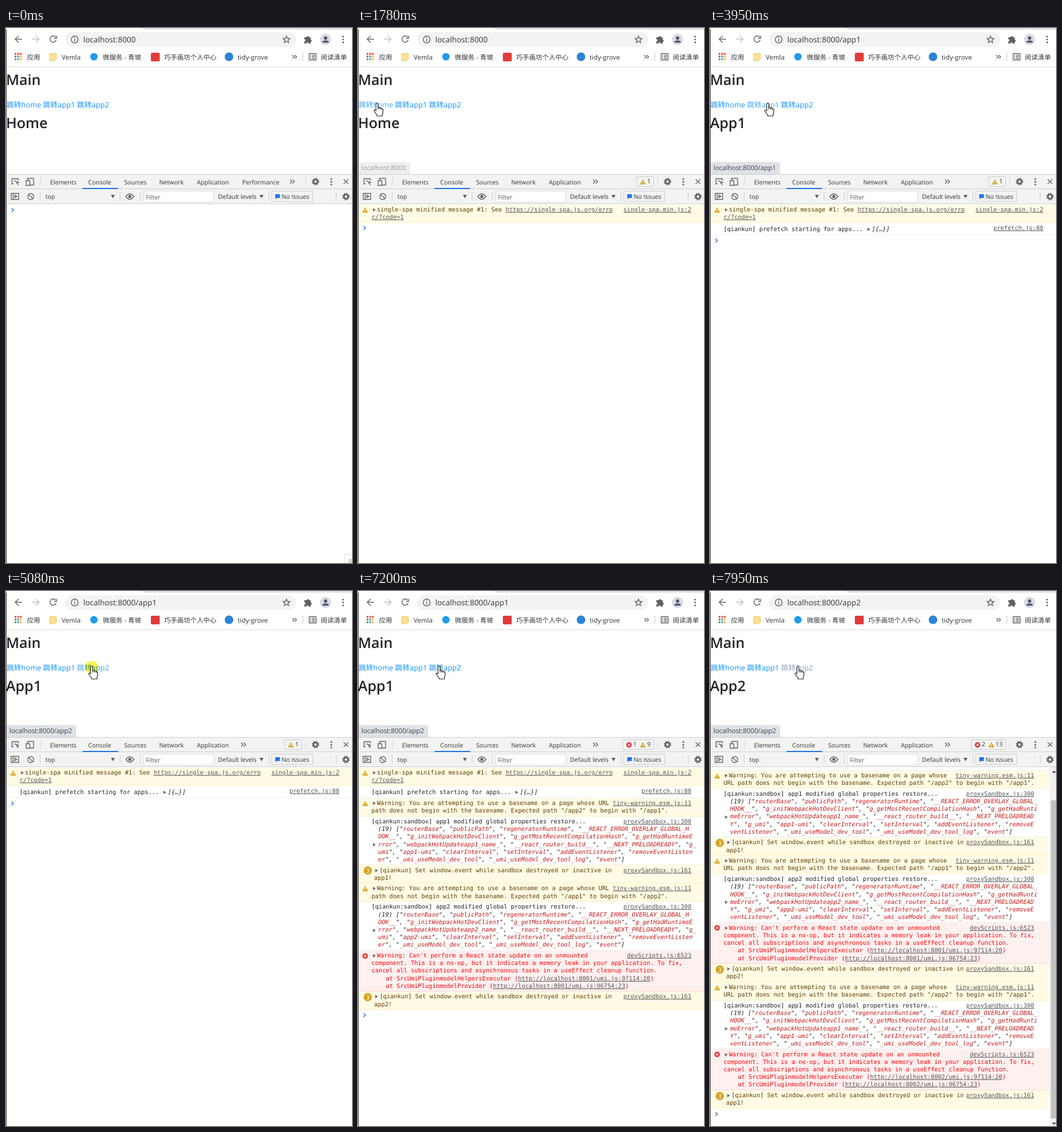
An HTML page that plays this animation: 602 by 930 pixels, repeating every 8 s.

```html
<!DOCTYPE html>
<html lang="zh">
<head>
<meta charset="utf-8">
<style>
html, body { margin: 0; width: 100%; height: 100%; overflow: hidden; background: #fff; }
#stage { position: relative; width: 602px; height: 930px; overflow: hidden; text-rendering: geometricPrecision;
  font: 10.7px "Open Sans", "Noto Sans", "Noto Sans CJK SC", "Noto Sans CJK", sans-serif; color: #333; }
#stage > * { position: absolute; }
svg { display: block; overflow: visible; }
text { fill: #333; }
.bm { font-size: 11.4px; }
.link { font-size: 12.8px; }
.head { font-size: 25px; font-weight: 600; fill: #212529; }
.ic { fill: none; stroke: #5f6368; stroke-width: 1.4; }
.solid { fill: #5f6368; }
.sep { stroke: #ccc; }
#status { left: 1px; top: 233px; height: 21px; padding: 0 7.5px 0 5px; line-height: 21px; font-size: 11.5px;
  background: #dee1e6; color: #3c4043; border-top-right-radius: 4px; box-sizing: border-box; }
#badge { right: 87px; top: 258px; height: 16px; padding: 0 4px 0 5px; line-height: 17px; border: 1px solid #ccc;
  border-radius: 2px; display: flex; align-items: center; gap: 2px; }
#badge b { font-weight: 400; margin-right: 3px; }
#badge b:last-child { margin-right: 1px; }
#console { left: 1px; top: 306px; width: 601px; height: 624px; overflow: hidden; background: #fff; }
#log { padding-top: .6px; font: 10.33px/13.2px "DejaVu Sans Mono", "Noto Sans Mono", monospace; }
.row { position: relative; white-space: pre; padding: 3.3px 0 1.15px 22.5px; border-bottom: 1px solid #f0f0f0; color: #222; }
.one { padding: 5.2px 0 2px 22.5px; }
.warn { background: #fffbe5; border-color: #fff0b8; color: #5c3c00; }
.win { padding-left: 27px; }
.err { background: #fff0f0; border-color: #ffd6d6; color: #f00; }
.row a { position: absolute; right: 22px; top: 3.3px; }
.row a, .row u { color: #545454; text-decoration: underline; }
.row > svg { position: absolute; left: 6px; top: 4px; }
.list { position: relative; padding-left: 11.5px; font-style: italic; }
.list s { color: #c41a16; text-decoration: none; }
.tri { display: inline-block; width: 9.4px; }
.tri::before { content: ""; display: block; width: 0; margin-left: 2px; border: 3.3px solid transparent;
  border-left: 5px solid #6e6e6e; border-right: 0; }
.list .tri { position: absolute; left: 0; top: 30px; }
.narrow .row { width: 567.5px; }
.narrow .win { width: 563px; }
.narrow .row a { right: 27px; }
#prompt { height: 30px; }
#cursor { left: 0; top: 0; }
#click { mix-blend-mode: multiply; }
</style>
</head>
<body>
<div id="stage">
<svg width="602" height="930">
  <path d="M237 0H602V3H243Q239 3 237 0" fill="#dee1e6"/>
  <rect x="103" y="7" width="402" height="26" rx="13" fill="#f1f3f4"/>
  <g class="ic">
    <path d="M28 19.500H16.500M22 13.500L16 19.500L22 25.500"/>
    <path d="M45 19.500H57M51.500 13.500L57.500 19.500L51.500 25.500" stroke="#bdc1c6" style="stroke:#bdc1c6"/>
    <path d="M86.500 16A5.500 5.500 0 1 0 87.300 21M88 13.500V18H83.500"/>
    <circle cx="119.500" cy="20" r="6"/><path d="M119.500 19V23.500M119.500 16.300V17.800"/>
    <path d="M488 14L489.700 18L494 18.300L490.700 21.100L491.800 25.300L488 23L484.200 25.300L485.300 21.100L482 18.300L486.300 18Z"/>
  </g>
  <path class="solid" d="M519 16H523A2 2 0 0 1 527 16H530V20A2 2 0 0 1 530 24V27H526.500A2 2 0 0 0 522.500 27H519V23.500A2 2 0 0 0 519 19.500Z"/>
  <circle cx="556" cy="20" r="10" fill="#dadde3"/>
  <path d="M550.500 25.500V24Q551 21.500 556 21.500T561.500 24V25.500Z" fill="#4d5878"/><circle cx="556" cy="17.500" r="3" fill="#4d5878"/>
  <g class="solid"><circle cx="586.500" cy="15" r="1.500"/><circle cx="586.500" cy="20" r="1.500"/><circle cx="586.500" cy="25" r="1.500"/></g>
  <text id="url" x="134.500" y="24.800" font-size="13.500"></text>

  <g id="apps"></g>
  <path d="M76.500 44.500H87.500V53L84 57H76.500Z" fill="#fde293" stroke="#e8c468"/>
  <circle cx="153" cy="50" r="6.500" fill="#1e9af0"/>
  <rect x="252" y="43" width="15.500" height="15" rx="2" fill="#e03c3a"/>
  <circle cx="388" cy="50" r="7.500" fill="#2f83d6"/>
  <g class="bm">
    <text x="36.500" y="54.500">应用</text>
    <text x="97" y="54.500">Vemla</text>
    <text x="168.500" y="54.500">微服务 - 青坡</text>
    <text x="275" y="54.500">巧手画坊个人中心</text>
    <text x="403" y="54.500">tidy-grove</text>
    <text x="547.500" y="54.500">阅读清单</text>
  </g>
  <path class="ic" d="M498.500 47L501.500 50L498.500 53M502.500 47L505.500 50L502.500 53"/>
  <path class="sep" d="M516.500 43V57"/>
  <path class="ic" d="M527.500 44.500H539.500V55.500H527.500ZM529.500 47.500H531M532.500 47.500H537.500M529.500 50H531M532.500 50H537.500M529.500 52.700H531M532.500 52.700H537.500"/>
  <path d="M0 67.500H602" stroke="#dadce0"/>

  <text class="head" x="0" y="99">Main</text>
  <text class="link" x="1" y="137.500">跳转home</text>
  <text class="link" x="64.500" y="137.500">跳转app1</text>
  <text class="link" x="123.500" y="137.500">跳转app2</text>
  <text class="head" id="page" x="0" y="174"></text>

  <path d="M0 254H602V305H0Z" fill="#f3f3f3"/>
  <path d="M0 254.500H602M0 279.500H602M0 305.500H602" stroke="#cbcdd1"/>
  <path d="M133 278H195V280H133Z" fill="#1a73e8"/>
  <g class="ic">
    <path d="M13 271H10.500V262H21.500V265M14.500 265.500L22 268.500L18.800 269.500L21.500 272.800"/>
    <path d="M37.500 266V261.500H48V273H42M35 265.500H41.500V273.500H35Z"/>
    <path d="M587.500 263L595.500 271M595.500 263L587.500 271"/>
    <path d="M9 287.500H22V298H9ZM12.500 287.500V298M15.500 290.500L19 292.800L15.500 295Z"/>
    <circle cx="43" cy="293" r="5.300"/><path d="M39.300 289.300L46.700 296.700"/>
    <path d="M208.500 293Q215.500 283.500 222.500 293Q215.500 302.500 208.500 293Z"/>
    <circle class="solid" cx="215.500" cy="293" r="2"/>
    <path id="more"/>
  </g>
  <g id="gears"></g>
  <g class="solid"><circle cx="566" cy="262.500" r="1.500"/><circle cx="566" cy="267.300" r="1.500"/><circle cx="566" cy="272" r="1.500"/></g>
  <path class="sep" d="M59.500 260V274M521.500 260V274M59.500 285V300M198.500 285V300M233.500 285V300M457.500 285V300M574.500 285V300"/>
  <path d="M239.500 283.500H361.500V302.500H239.500Z" fill="#fff" stroke="#ddd"/>
  <path d="M462.500 283.500H533.500V301.500H462.500Z" fill="#f3f3f3" stroke="#ccc"/>
  <path d="M468.500 289H476.500V295.500H471L468.500 297.500Z" fill="#1a73e8"/>
  <path class="solid" d="M182.500 290H189.500L186 296ZM441 290H448L444.500 296Z"/>
  <text x="76.500" y="271.500">Elements</text>
  <text x="143" y="271.500">Console</text>
  <text x="205.500" y="271.500">Sources</text>
  <text x="266.500" y="271.500">Network</text>
  <text x="332" y="271.500">Application</text>
  <text id="perf" x="411" y="271.500">Performance</text>
  <text x="68.500" y="297">top</text>
  <text x="243.500" y="297.500" style="fill:#555">Filter</text>
  <text x="369" y="297">Default levels</text>
  <text x="479.500" y="297">No Issues</text>
</svg>
<div id="status"></div>
<div id="badge"></div>
<div id="console"><div id="log"></div><div id="prompt"><svg width="20" height="20"><path id="chev" d="M8.500 6L12 9.300L8.500 12.600" fill="none" stroke-width="1.500"/></svg></div></div>
<svg id="bar" style="left:0;top:0" width="602" height="930">
  <path d="M591 306H602V930H591Z" fill="#f1f1f1"/><path d="M593 364H602V917H593Z" fill="#c1c1c1"/>
  <path d="M595 316L598.500 312L602 316ZM595 924L598.500 928L602 924Z" fill="#505050"/>
</svg>
<svg id="tip" style="left:0;top:0" width="602" height="930">
  <rect x="588.500" y="915.500" width="30" height="20" rx="2" fill="#fff" stroke="#d8d8d8"/>
  <text x="594" y="932" font-size="11" style="fill:#aaa">录</text>
</svg>
<svg style="left:0;top:0" width="1" height="930"><path d="M0 3H1V930H0Z" fill="#3a3a3a"/></svg>
<svg id="click" style="left:0;top:0" width="26" height="26"><circle cx="0" cy="2" r="11.500" fill="#fdf158"/></svg>
<svg id="cursor" width="1" height="1" fill="#fff" stroke="#222" stroke-width="1.200" stroke-linejoin="round">
  <path id="arrow" d="M0 0V15L3.500 11.800L5.800 16.800L7.800 15.900L5.600 11H10.400Z"/>
  <path id="hand" d="M-1.800 1.200a1.800 1.800 0 0 1 3.600 0v6.200c1-.8 2.900-.5 3.200.8 1-.6 2.700-.2 3 1 1.200-.4 2.500.3 2.500 1.800v4c0 2-1.300 3-1.300 5v2H.2v-1.500c-1-2-3.500-4-5-6.500-1-1.800.8-3 2-2l1 1zM1.800 7.400v3M5 8.200v2.500M8 9.200v2"/>
</svg>
</div>
<script>
const $ = id => document.getElementById(id);
const links = document.querySelectorAll('text.link');

// Small icons built from rules
const dotColors = ['#ea4335', '#ea4335', '#ea4335', '#34a853', '#4285f4', '#fbbc04', '#34a853', '#4285f4', '#fbbc04'];
$('apps').innerHTML = dotColors.map((c, i) =>
  `<rect x="${15 + i % 3 * 4.6}" y="${43.5 + (i / 3 | 0) * 4.6}" width="3" height="3" fill="${c}"/>`).join('');
$('gears').innerHTML = [[538.5, 267], [591.5, 293]].map(([x, y]) =>
  `<g fill="none" stroke="#5f6368"><circle cx="${x}" cy="${y}" r="3.600" stroke-width="2.800"/>
  <circle cx="${x}" cy="${y}" r="5.500" stroke-width="2" stroke-dasharray="2.160"/></g>`).join('');

const icon = body => `<svg width="11" height="11">${body}</svg>`;
const warnIcon = icon('<path d="M5.500 .8L10.500 10H.5Z" fill="#d9a521"/><path d="M5.500 4V7M5.500 8V9.200" stroke="#fff" stroke-width="1.200"/>');
const errIcon = icon('<circle cx="5.500" cy="5.500" r="4.800" fill="#e33b3b"/><path d="M3.700 3.700L7.300 7.300M7.300 3.700L3.700 7.300" stroke="#fff" stroke-width="1.200"/>');
const threeIcon = icon('<circle cx="10" cy="6" r="7.200" fill="#d6a21c"/><text x="10" y="9.500" text-anchor="middle" style="fill:#fff">3</text>');

// Console entries: "|" breaks a line in the wide layout, "~" in the narrow one
const tri = '<span class="tri"></span>';
const entry = (kind, text, src, sign = '', warns = 0, errs = 0) => ({ kind, text, src, sign, warns, errs });
const basename = (path, base) => entry('warn', tri + 'Warning: You are attempting to use a basename on a page whose ~URL |' +
  `path does not begin with the basename. Expected path "/app${path}" to begin with "/app${base}".`, 'tiny-warning.esm.js:11', warnIcon, 1);
const restore = n => entry('log', `[qiankun:sandbox] app${n} modified global properties restore...<div class="list">${tri}` +
  ('(19) [`routerBase`, `publicPath`, `regeneratorRuntime`, `__REACT_ERROR_OVERLAY_GLOBAL_~H|OOK__`, `g_initWebpackHotDevClient`, ' +
  '`g_getMostRecentCompilationHash`, `g_getHadRunti~meE|rror`, `webpackHotUpdateapp' + n + '_name_`, `__react_router_build__`, ' +
  '`__NEXT_PRELOADREAD~Y`, `g_|umi`, `app' + n + '-umi`, `clearInterval`, `setInterval`, `addEventListener`, `removeE~ventListen|er`, ' +
  '`_umi_useModel_dev_tool`, `_umi_useModel_dev_tool_log`, `event`]').replace(/`([^`]*)`/g, '"<s>$1</s>"') + '</div>', 'proxySandbox.js:300');
const destroyed = n => entry('warn win', `${tri}[qiankun] Set window.event while sandbox destroyed or inactive in\napp${n}!`,
  'proxySandbox.js:161', threeIcon, 3);
const unmounted = port => entry('err', `${tri}Warning: Can't perform a React state update on an unmounted
component. This is a no-op, but it indicates a memory leak in your application. To fix,
cancel all subscriptions and asynchronous tasks in a useEffect cleanup function.
    at SrcUmiPluginmodelHelpersExecutor (<u>http://localhost:${port}/umi.js:97114:20</u>)
    at SrcUmiPluginmodelProvider (<u>http://localhost:${port}/umi.js:96754:23</u>)`, 'devScripts.js:6523', errIcon, 0, 1);

const entries = [
  entry('warn', tri + 'single-spa minified message #1: See <u>https://single-spa.js.org/erro|r/?code=1</u>', 'single-spa.min.js:2', warnIcon, 1),
  entry('one', `[qiankun] prefetch starting for apps... ${tri}<i>[{…}]</i>`, 'prefetch.js:88'),
  basename(2, 1), restore(1), destroyed(1),
  basename(1, 2), restore(2), unmounted(8001), destroyed(2),
  basename(2, 1), restore(1), unmounted(8002), destroyed(1)
];
const logTimes = [1400, 3750, 5290, 5510, 5570, 6590, 6660, 6730, 6730, 7800, 7870, 7870, 7940];
const pages = [[0, ''], [3610, 'app1'], [5150, 'app2'], [6530, 'app1'], [7800, 'app2']];
const clicks = [[3540, 3680], [5080, 5220], [6470, 6600], [7740, 7870]];
const path = [[0, 598, 925], [70, 598, 925], [820, 363, 447], [950, 363, 447], [1540, 49, 127], [1680, 33, 131], [2050, 33, 131],
  [2800, 91, 131], [3800, 91, 131], [4270, 149, 131], [5150, 149, 131], [5250, 147, 131], [5970, 147, 131], [6370, 85, 131],
  [6800, 85, 131], [7140, 141, 131], [7420, 153, 131], [8000, 153, 131]];

// Position of the pointer, sampled every 70 ms
function cursorAt(time) {
  const t = Math.max(0, Math.floor(time / 70) * 70);
  const i = path.findIndex(p => p[0] > t);
  const [a, x, y] = path[i - 1], [b, u, v] = path[i];
  const k = (t - a) / (b - a), e = k * k * (3 - 2 * k);
  return [x + (u - x) * e, y + (v - y) * e];
}
const linkAt = ([x, y]) => y > 124 && y < 145 ? (x < 63 ? 0 : x < 122 ? 1 : 2) : -1;

let shown = -1;
function showLog(count) {
  if (count === shown) return;
  shown = count;
  const narrow = count >= 12, list = entries.slice(0, count);
  const sum = key => list.reduce((n, e) => n + e[key], 0);
  const wrap = s => narrow ? s.replace(/~/g, '\n').replace(/\|/g, '') : s.replace(/\|/g, '\n').replace(/~/g, '');
  $('log').className = narrow ? 'narrow' : '';
  $('log').innerHTML = list.map(e => `<div class="row ${e.kind}">${e.sign}${wrap(e.text)}<a>${e.src}</a></div>`).join('');
  $('console').scrollTop = narrow ? 9999 : 0;
  $('bar').style.display = narrow ? '' : 'none';
  $('badge').style.display = count ? '' : 'none';
  $('badge').innerHTML = (sum('errs') ? `${errIcon}<b>${sum('errs')}</b>` : '') + `${warnIcon}<b>${sum('warns')}</b>`;
  $('perf').style.display = count ? 'none' : '';
  const x = count ? 409 : 494;
  $('more').setAttribute('d', `M${x} 263.500l3.500 3.500l-3.500 3.500m4.500 -7l3.500 3.500l-3.500 3.500`);
}

function draw(t) {
  const show = (id, on) => $(id).style.visibility = on ? 'visible' : 'hidden';
  const page = pages.filter(p => p[0] <= t).pop()[1];
  $('url').textContent = 'localhost:8000' + (page && '/' + page);
  $('page').textContent = page ? 'A' + page.slice(1) : 'Home';
  showLog(logTimes.filter(s => s <= t).length);

  const [x, y] = cursorAt(t), over = linkAt([x, y]);
  const lit = linkAt(cursorAt(t - 150)) === over ? over : -1;
  links.forEach((l, i) => l.style.fill = i !== lit ? '#1890ff' : t >= 7870 ? '#8fa3b8' : '#40a9ff');
  $('cursor').style.transform = $('click').style.transform = `translate(${x}px,${y}px)`;
  show('arrow', t >= 70 && over < 0);
  show('hand', over >= 0);
  show('click', clicks.some(([a, b]) => t >= a && t < b));
  show('tip', t < 70);

  $('status').textContent = 'localhost:8000' + ['', '/app1', '/app2'][Math.max(over, 0)];
  $('status').style.opacity = t < 1850 ? (t < 1750 ? 0 : .5) : 1;
  $('chev').style.stroke = t >= 5290 && t < 6730 || t >= 7800 ? '#727272' : '#367cf1';
}

const start = performance.now();
function tick() {
  draw((performance.now() - start) % 8000);
  requestAnimationFrame(tick);
}
tick();
</script>
</body>
</html>
```
